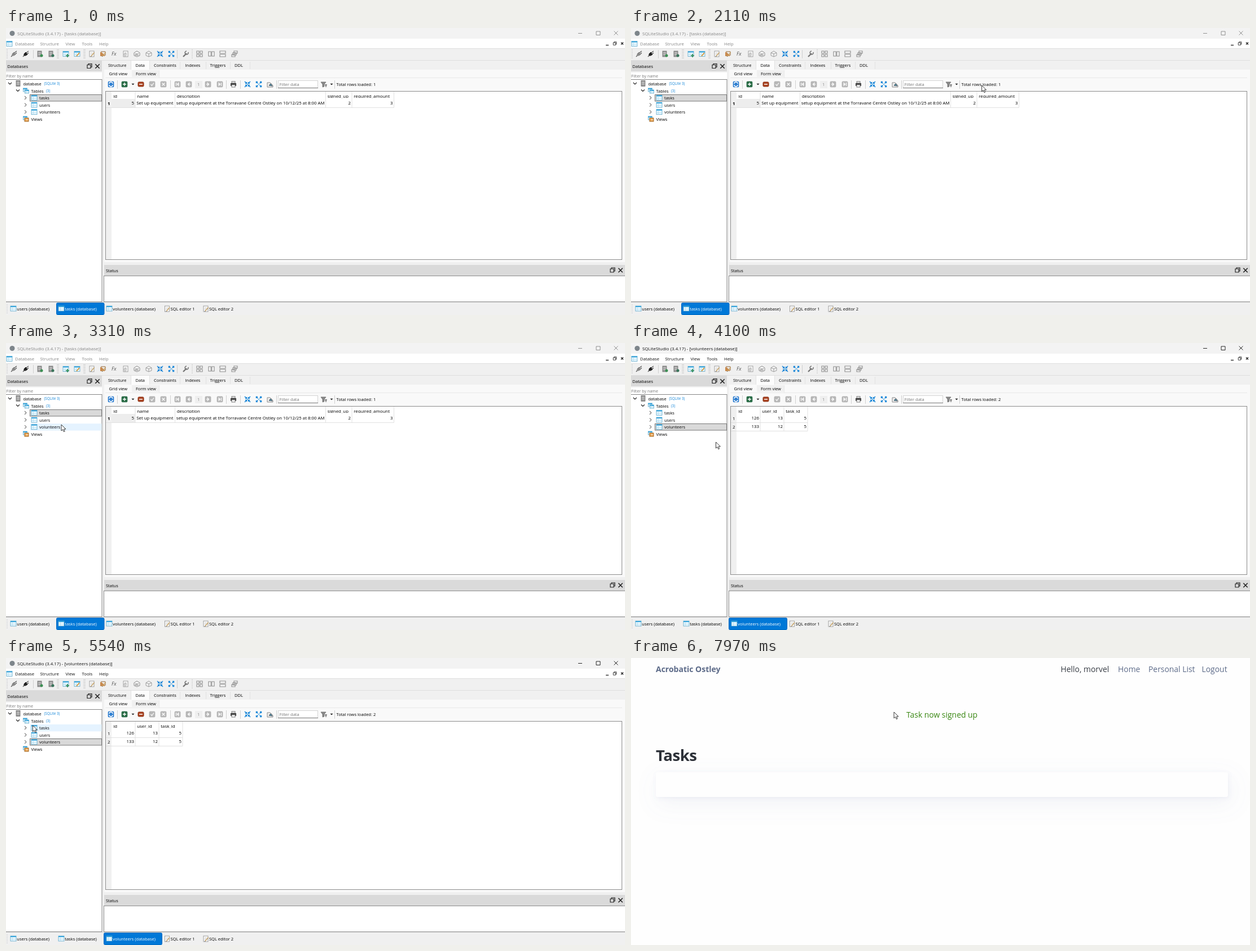
Recreate the animation shown at these times as an HTML page. Size 1097x510 px, loop 8000 ms.

```html
<!DOCTYPE html>
<html lang="en">
<head>
<meta charset="utf-8">
<title>Task sign-up demo</title>
<style>
  html, body { margin: 0; width: 100%; height: 100%; overflow: hidden; background: #fefefe; }
  svg { display: block; width: 1097px; height: 510px; font: 7.5px "Open Sans", "Noto Sans", sans-serif; }
  text { white-space: pre; }
  .web { font-size: 13.9px; fill: #5d6b89; }
  .web .strong { font-size: 14px; font-weight: 700; }
  .web .title { font-size: 27.6px; font-weight: 700; letter-spacing: -.5px; fill: #2d3138; }
</style>
</head>
<body>
<svg id="stage" viewBox="0 0 1097 510" xmlns="http://www.w3.org/2000/svg"></svg>
<script>
const LOOP = 8000;
const ACTIVATE = 3480, OPEN_TABLE = 3600, WEB = 5780, SIGNED_UP = 7360;

const stage = document.getElementById('stage');
const rect = (x, y, w, h, fill, stroke = 'none', extra = '') =>
  `<rect x="${x}" y="${y}" width="${w}" height="${h}" fill="${fill}" stroke="${stroke}" ${extra}/>`;
const text = (x, y, s, fill = '#000', extra = '') => `<text x="${x}" y="${y}" fill="${fill}" ${extra}>${s}</text>`;
const path = (d, stroke = '#555', fill = 'none', width = 1) =>
  `<path d="${d}" stroke="${stroke}" fill="${fill}" stroke-width="${width}"/>`;
const group = (id, body, extra = '') => `<g id="${id}" ${extra}>${body}</g>`;
const at = (x, y, body) => `<g transform="translate(${x} ${y})">${body}</g>`;

// Icons are drawn around their own centre.
const sheet = (w = 10, h = 9) => rect(-w / 2, -h / 2, w, h, '#eaf8ff', '#5aa5c8', 'stroke-width=".8"') +
  rect(-w / 2, -h / 2, w, 2, '#39a5dc') + path(`M${-w / 2} 1H${w / 2}M-1.5 -2V${h / 2}`, '#a9d8ee', 'none', .7);
const page = rect(-4, -5, 8, 10, '#fbfbfb', '#8b8b8b', 'stroke-width=".8"') + path('M-2 -2H2M-2 0H2M-2 2H1', '#bbb', 'none', .7);
const pencil = path('M-1 4L4.5 -2.5', '#c9a66a', 'none', 1.5) + path('M-2 5L-1 4', '#444');
const server = c => rect(-4, -5, 7, 10, '#999', '#666', 'stroke-width=".7"') +
  path('M-3 -2H2M-3 1H2', '#e8e8e8', 'none', .9) + (c ? `<circle cx="3" cy="3" r="2.5" fill="${c}"/>` : '');
const plug = c => path('M-5 5L-2 2M1 -2L5 -5M2 1L5 -2', '#555', 'none', 1.2) + path('M-3 0L0 -3L3 1L0 3L-3 3Z', c, c);
const arrows = out => [0, 90, 180, 270].map(a => `<g transform="rotate(${a})">` +
  path(out ? 'M1.5 -1.5L4 -4M2 -4.5H4.5V-2' : 'M1.5 -1.5L5 -5M1.5 -4V-1.5H4', '#1e88d8', 'none', 1.5) + '</g>').join('') +
  rect(-1, -1, 2, 2, '#6dbbe9');
const button = (fill, mark, edge = fill) => rect(-5, -5, 10, 10, fill, edge, 'rx="1.5" stroke-width=".6"') + path(mark, '#fff', 'none', 1.4);
const gray = mark => rect(-5, -5, 10, 10, '#b8b8b8', '#a4a4a4', 'rx="1.5" stroke-width=".6"') + path(mark, '#fafafa', 'none', 1.3);
const windows = d => path(d, '#8a8a8a', '#f8f8f8', 1.1);
const box = path('M0 -5L5 -2V3L0 5L-5 3V-2ZM-5 -2L0 0L5 -2M0 0V5', '#8b8b8b', '#f0f0f0', .8);
const restore = path('M-2 -2V-4H4V2H2M-4 -2H2V4H-4Z', '#222', 'none', 1.2);
const cross = (r, c, w) => path(`M${-r} ${-r}L${r} ${r}M${r} ${-r}L${-r} ${r}`, c, 'none', w);
const funnel = path('M-5 -4H4L1 0V4L-2 5V0Z', '#666', '#888', .7) + path('M2 1H6M4 1V5', '#333');
const drop = path('M-2.5 -1.3H2.5L0 1.5Z', 'none', '#222');

function toolbar() {
  const icons = [
    [14, plug('#888')], [35, plug('#222')], [60, server('#3b8f53')], [80, server('#39745a')],
    [106, sheet() + path('M3 0V6M0 3H6', '#2f8c55', 'none', 1.7)], [126, sheet() + path('M-1 4L4 -2', '#d99432', 'none', 1.8)],
    [152, page + pencil], [172, rect(-5, -3, 8, 7, '#c88a4f') + path('M-4 -4H4V3', '#8e6233', '#eee') + pencil],
    [192, text(-5, 3, 'Fx', '#555', 'font-size="9" font-style="italic"')],
    [212, page + text(-3, 3, '()', '#777')],
    [232, path('M0 -5L5 -2V3L0 5L-5 3V-2Z', '#8a8a8a', '#f6f6f6') + text(-3.6, 2.5, 'az', '#555', 'font-size="6.5"')],
    [253, box], [273, arrows(false)], [293, arrows(true)],
    [318, path('M-4 5L2 -1', '#777', 'none', 2.4) + path('M5 -3A3 3 0 1 1 2 -5', '#777', 'none', 1.6)],
    [343, windows('M-5 -5H-1V-1H-5ZM1 -5H5V-1H1ZM-5 1H-1V5H-5ZM1 1H5V5H1Z')],
    [364, windows('M-5 -4H-.8V4H-5ZM.8 -4H5V4H.8Z')],
    [384, windows('M-5 -5H5V-1H-5ZM-5 1H5V5H-5Z')],
    [405, windows('M-1 -5H5V-1H-1ZM-3 -2H3V2H-3ZM-5 1H1V5H-5Z')]];
  return icons.map(([x, body]) => at(x, 46, body)).join('') +
    path('M48.5 39V54M303.5 39V54', '#cfcfcf') +
    [2, 91, 93, 138, 140, 330].map(x => `<path d="M${x} 38V55" stroke="#aaa" stroke-dasharray="1 1.5"/>`).join('');
}

function gridToolbar() {
  const icons = [
    [186, button('#2f7fd0', 'M-3 -1A3 3 0 0 1 3 -1M3 1A3 3 0 0 1 -3 1')],
    [210, button('#286b45', 'M-3 0H3M0 -3V3')], [225, drop],
    [239, rect(-5, -4, 10, 8, '#a9411f', '#8c3216', 'rx="1.5"') + path('M-3 0H3', '#fff', 'none', 1.5)],
    [259, gray('M-2.5 0L-.5 2.5L3 -2.5')], [279, gray('M-2.5 -2.5L2.5 2.5M2.5 -2.5L-2.5 2.5')],
    [304, gray('M-2.5 -3V3M2.5 -3L-.5 0L2.5 3M-.5 0H3')], [324, gray('M1.5 -3L-1.5 0L1.5 3M-1.5 0H3')],
    [358, gray('M-1.5 -3L1.5 0L-1.5 3M1.5 0H-3')], [379, gray('M2.5 -3V3M-2.5 -3L.5 0L-2.5 3M.5 0H-3')],
    [403, rect(-3, -5, 6, 3, '#eee', '#777') + rect(-5, -2, 10, 5, '#444') + rect(-3, 1, 6, 4, '#fff', '#777')],
    [428, arrows(false)], [448, arrows(true)],
    [468, path('M-5 -3H0L5 2V5H-5Z', '#888', '#eee') + path('M-2 2L1 -1L4 3Z', '#456', '#59a')],
    [563, funnel], [577, drop]];
  return icons.map(([x, body]) => at(x, 100, body)).join('') +
    path('M197.5 93V108M291.5 93V108M390.5 93V108M415.5 93V108M479.5 93V108M582.5 93V108', '#d0d0d0') +
    rect(335, 94, 13, 13, '#efefef') + text(339, 103, '1', '#888') +
    rect(482.5, 93.5, 70, 13, '#fff', '#d4d4d4') + path('M482 106.5H553', '#777') + text(484.5, 103, 'Filter data', '#777');
}

const TABLES = {
  tasks: {
    edges: [187, 229, 299.5, 566.5, 613, 687.5],
    names: ['id', 'name', 'description', 'signed_up', 'required_amount'],
    rows: [[5, 'Set up equipment', 'setup equipment at the Torravane Centre Ostley on 10/12/25 at 8:00 AM', 2, 3]]
  },
  volunteers: {
    edges: [187, 229, 271, 313],
    names: ['id', 'user_id', 'task_id'],
    rows: [[126, 13, 5], [133, 12, 5]]
  }
};

function grid(key) {
  const { edges, names, rows } = TABLES[key];
  const right = edges[edges.length - 1], bottom = 126.5 + rows.length * 15;
  let out = key === 'tasks' ? rect(187, 126, 42, 15, '#ededed') : '';
  out += edges.slice(1).map(x => path(`M${x} 113V${bottom}`, '#dedede', 'none', .9)).join('');
  out += '<g clip-path="url(#headerClip)">' + names.map((n, i) => text(edges[i] + 3.3, 123.8, n)).join('') + '</g>';
  rows.forEach((row, r) => {
    const y = 135.5 + r * 15;
    out += path(`M177 ${y + 6}H${right}`, '#dedede', 'none', .9);
    out += text(180, y + 1.5, r + 1, '#000', key === 'tasks' ? 'font-weight="700"' : '');
    row.forEach((v, i) => {
      out += typeof v === 'number' ? text(edges[i + 1] - 2, y, v, '#000', 'text-anchor="end"') : text(edges[i] + 2.2, y, v);
    });
  });
  return group('grid-' + key, out, 'font-size="7.85"') +
    group('total-' + key, text(585.5, 103, 'Total rows loaded: ' + rows.length));
}

function tree() {
  const chevron = (x, y, open) => path(open ? `M${x - 3} ${y - 1.5}L${x} ${y + 1.5}L${x + 3} ${y - 1.5}` : `M${x - 1.5} ${y - 3}L${x + 1.5} ${y}L${x - 1.5} ${y + 3}`, open ? '#222' : '#777', 'none', 1.1);
  return chevron(7, 98.5, true) + at(22, 98.5, server()) + text(30.5, 101.5, 'database') + text(67.5, 101, '(SQLite 3)', '#1687d9', 'font-size="6.3"') +
    chevron(21, 111, true) + at(34, 110, sheet(7, 6)) + at(37, 113, sheet(7, 6)) + text(44.5, 114.5, 'Tables') + text(71, 113.5, '(3)', '#1687d9', 'font-size="6.3"') +
    ['tasks', 'users', 'volunteers'].map((n, i) => chevron(34.5, 124 + i * 12.6, false) + at(50, 124 + i * 12.6, sheet()) + text(59, 127 + i * 12.6, n)).join('') +
    at(34, 160, sheet(7, 6)) + at(37, 163, rect(-4, -3, 7, 6, '#e9a04a', '#a26a2b') + path('M-2 0H2', '#fff')) + text(44.5, 164.8, 'Views');
}

function studio() {
  const menu = [['Database', 16], ['Structure', 60.5], ['View', 105.5], ['Tools', 134.5], ['Help', 165]];
  const tabs = [['Structure', 181], ['Data', 229.5], ['Constraints', 262], ['Indexes', 317.5], ['Triggers', 361.5], ['DDL', 405]];
  const docs = [['users', 8], ['tasks', 93], ['volunteers', 178]];
  return rect(0, 0, 1097, 510, '#f0f0f0') + rect(0, 0, 1097, 19, '#f3f3f3') + rect(0, 19, 1097, 17, '#fff') +
    `<circle cx="11" cy="9.5" r="4.5" fill="#7d858b"/>` +
    group('chrome',
      '<g font-size="7.95">' + text(20, 12.5, 'SQLiteStudio (3.4.17) - [tasks (database)]', 'currentColor', 'id="caption"') + '</g>' +
      '<g font-size="7.75">' + menu.map(([s, x]) => text(x, 30.8, s, 'currentColor')).join('') + '</g>' +
      path('M1014 9.5H1021M1046 6H1053V12.5H1046Z', 'currentColor', 'none', .9) + at(1081, 9, cross(3.5, 'currentColor', .9))) +
    at(6, 28, sheet()) + path('M1063 30.5H1068', '#222', 'none', 1.3) + at(1079, 27.5, `<g transform="scale(.7)">${restore}</g>`) + at(1092, 27.5, cross(2, '#222', 1.2)) +
    path('M0 36.5H1097M0 57.5H1097', '#dedede') + toolbar() +
    // database dock
    rect(0, 58, 170, 19, '#dadada') + text(2.5, 71, 'Databases') + at(148, 67.5, restore) + at(162, 68, cross(3.7, '#222', 1.6)) +
    rect(0, 79, 170, 12, '#fff') + text(.5, 88, 'Filter by name', '#777', 'font-size="7.2"') +
    rect(-.5, 91.5, 170.5, 395, '#fff', '#858585') +
    rect(43, 118, 126.5, 12.4, '#e5f3ff', 'none', 'id="rowHover"') + rect(42.5, 118.5, 127, 11.5, '#d9d9d9', '#777', 'id="rowSelected"') + tree() +
    // editor tabs
    rect(174, 74, 923, 342, '#f9f9f9') + rect(174, 58, 258, 16, '#f1f1f1') + rect(221, 58, 33, 16, '#fcfcfc') +
    path('M221.5 58V74M254.5 58V74M308.5 60V73M354.5 60V73M397.5 60V73M432.5 60V73', '#e2e2e2') +
    tabs.map(([s, x]) => text(x, 69, s)).join('') +
    rect(223, 75, 48, 12, '#f0f0f0') + path('M176 88.5H1092M271.5 75V88', '#e8e8e8') + text(182.5, 84, 'Grid view') + text(230, 84, 'Form view') +
    gridToolbar() +
    rect(176.5, 112.5, 915, 299, '#fff', '#8c8c8c') + rect(177, 113, 10, 298, '#f0f0f0') +
    rect(187, 113, 0, 12.5, '#d9ebf9', 'none', 'id="headHover"') + grid('tasks') + grid('volunteers') +
    // status dock
    rect(174, 421, 923, 19, '#dadada') + text(177, 433.5, 'Status') + at(1075, 430, restore) + at(1089, 430.5, cross(3.7, '#222', 1.6)) +
    rect(173.5, 440.5, 924, 46, '#fff', '#8c8c8c') +
    // open documents
    path('M0 487.5H1097', '#dedede') + `<path d="M2 491V508" stroke="#bbb" stroke-dasharray="1 1.5"/>` +
    rect(89.5, 488.5, 84.5, 21, '#0078d7', '#0069c0', 'id="docSelected" rx="2"') +
    docs.map(([n, x]) => at(x + 5, 498.5, sheet()) + text(x + 11.3, 502, n + ' (database)', '#000', `id="doc-${n}"`)).join('') +
    [1, 2].map(n => at(217 + n * 68.5, 499, page + pencil) + text(223 + n * 68.5, 502, 'SQL editor ' + n)).join('');
}

function web() {
  return rect(0, 0, 1097, 510, '#fefefe') +
    text(44, 25, 'Acrobatic Ostley', '#5d6b89', 'class="strong"') + text(761.5, 25, 'Hello, morvel', '#373c44') +
    text(863, 25, 'Home', '#5d6b89') + text(917, 25, 'Personal List', '#5d6b89') + text(1011.5, 25, 'Logout', '#5d6b89') +
    group('notice', text(488, 106, 'Task now signed up', '#398712')) +
    group('panel', text(44, 102.5, 'Tasks', '#2d3138', 'class="title"') +
      rect(44, 122.5, 1014, 66, '#fefefe', 'none', 'id="card" rx="4" filter="url(#shadow)"')) +
    group('item', rect(71, 146, 6, 6, '#2d3138') + group('link',
      path('M88.7 144.5H97.8V153.5H88.7Z', 'currentColor', 'none', 1) +
      text(103, 153.5, 'Set up equipment', 'currentColor', 'class="strong"') +
      path('M87.5 156.5H227', 'currentColor', 'none', 1)));
}

stage.innerHTML = `<defs><clipPath id="headerClip"><rect x="187" y="113" width="904" height="11.2"/></clipPath>
  <filter id="shadow" x="-10%" y="-150%" width="120%" height="450%">
    <feDropShadow dx="1" dy="2" stdDeviation="3" flood-color="#8191b5" flood-opacity=".09"/>
    <feDropShadow dx="5" dy="11" stdDeviation="19" flood-color="#8191b5" flood-opacity=".1"/>
  </filter></defs>` +
  group('studio', studio()) + group('web', web(), 'class="web"') +
  group('arrow', path('M0 0V11L2.6 8.7L4.4 12.7L6.2 11.9L4.5 8H8Z', '#222', '#fff', .9)) +
  group('hand', path('M-1 0C-1 -1.3 1.2 -1.3 1.2 0V5L6 6.2Q7 6.5 7 8V11L5.5 15H0L-3.8 9.8Q-4.3 8.2 -2.8 8.2L-1 9.5Z', '#222', '#fff', .9) + path('M3 6V8M5 6.5V8.5', '#222', 'none', .7));

const el = id => document.getElementById(id);
const show = (id, on) => el(id).setAttribute('display', on ? 'inline' : 'none');
const set = (id, attrs) => Object.entries(attrs).forEach(([k, v]) => el(id).setAttribute(k, v));

// Pointer route: time, x, y.
const ROUTE = [
  [230, 962, 490], [520, 860, 330], [800, 690, 170], [1010, 599, 122], [1190, 545, 127], [1400, 575, 160],
  [1600, 660, 164], [1720, 696, 135], [1830, 697, 100], [1960, 710, 125], [2110, 622, 102], [2300, 588, 146],
  [2500, 527, 146], [2660, 543, 132], [2900, 380, 101], [3150, 140, 132], [3310, 98, 145], [3930, 98, 145],
  [4100, 150, 176], [4350, 280, 160], [4550, 290, 122], [4720, 205, 118], [4900, 260, 135], [5050, 319, 150],
  [5200, 300, 176], [5400, 130, 150], [5540, 48, 120], [5580, 25, 116], [6010, 25, 116], [6160, 20, 73],
  [6320, 60, 118], [6450, 96, 150], [6720, 96, 150], [7770, 96, 150], [7970, 466, 96], [8000, 466, 96]];

function slope(i, axis) {
  const a = ROUTE[i - 1], p = ROUTE[i], b = ROUTE[i + 1];
  if (!a || !b || a[axis] === p[axis] || b[axis] === p[axis]) return 0;
  if ((p[axis] - a[axis]) * (b[axis] - p[axis]) < 0) return 0;
  return (b[axis] - a[axis]) / (b[0] - a[0]);
}

function pointer(t) {
  const i = Math.max(0, ROUTE.findIndex(p => p[0] > t) - 1);
  const a = ROUTE[i], b = ROUTE[i + 1], d = b[0] - a[0];
  const u = Math.max(0, (t - a[0]) / d), v = 1 - u;
  return [1, 2].map(k => a[k] * v * v * (1 + 2 * u) + b[k] * u * u * (3 - 2 * u) +
    d * u * v * (slope(i, k) * v - slope(i + 1, k) * u));
}

function render(t) {
  const [x, y] = pointer(t);
  const active = t >= ACTIVATE, opened = t >= OPEN_TABLE, browsing = t >= WEB, done = t >= SIGNED_UP;
  const table = opened ? 'volunteers' : 'tasks';

  show('studio', !browsing);
  show('web', browsing);
  set('chrome', { color: active ? '#111' : '#868686' });
  el('caption').textContent = `SQLiteStudio (3.4.17) - [${table} (database)]`;
  for (const name in TABLES) {
    show('grid-' + name, name === table);
    show('total-' + name, name === table);
    set('doc-' + name, { fill: name === table ? '#fff' : '#000' });
  }
  set('docSelected', opened ? { x: 173.5, width: 103 } : { x: 89.5, width: 84.5 });
  set('rowSelected', { y: active ? 143.5 : 118.5 });

  const row = Math.floor((y - 117.8) / 12.6);
  show('rowHover', t >= 230 && x > 42 && x < 170 && row >= 0 && row < 4);
  set('rowHover', { y: 118 + row * 12.6 });

  const { edges } = TABLES[table];
  const col = edges.findIndex((e, i) => x >= e && x < edges[i + 1]);
  const overHead = t >= 230 && col >= 0 && y > 112 && y < 128.5;
  show('headHover', overHead);
  if (overHead) set('headHover', { x: edges[col], width: edges[col + 1] - edges[col] });

  const overLink = browsing && !done && x > 87 && x < 228 && y > 138 && y < 160;
  show('notice', done);
  show('item', !done);
  set('panel', { transform: `translate(0 ${done ? 80.5 : 0})` });
  set('card', { height: done ? 44 : 66 });
  set('link', { color: overLink ? '#48536b' : '#5d6b89' });
  show('arrow', t >= 230 && !overLink);
  show('hand', overLink);
  for (const id of ['arrow', 'hand']) set(id, { transform: `translate(${x} ${y})` });
}

const start = performance.now();
function frame() {
  render((performance.now() - start) % LOOP);
  requestAnimationFrame(frame);
}
frame();
</script>
</body>
</html>
```
